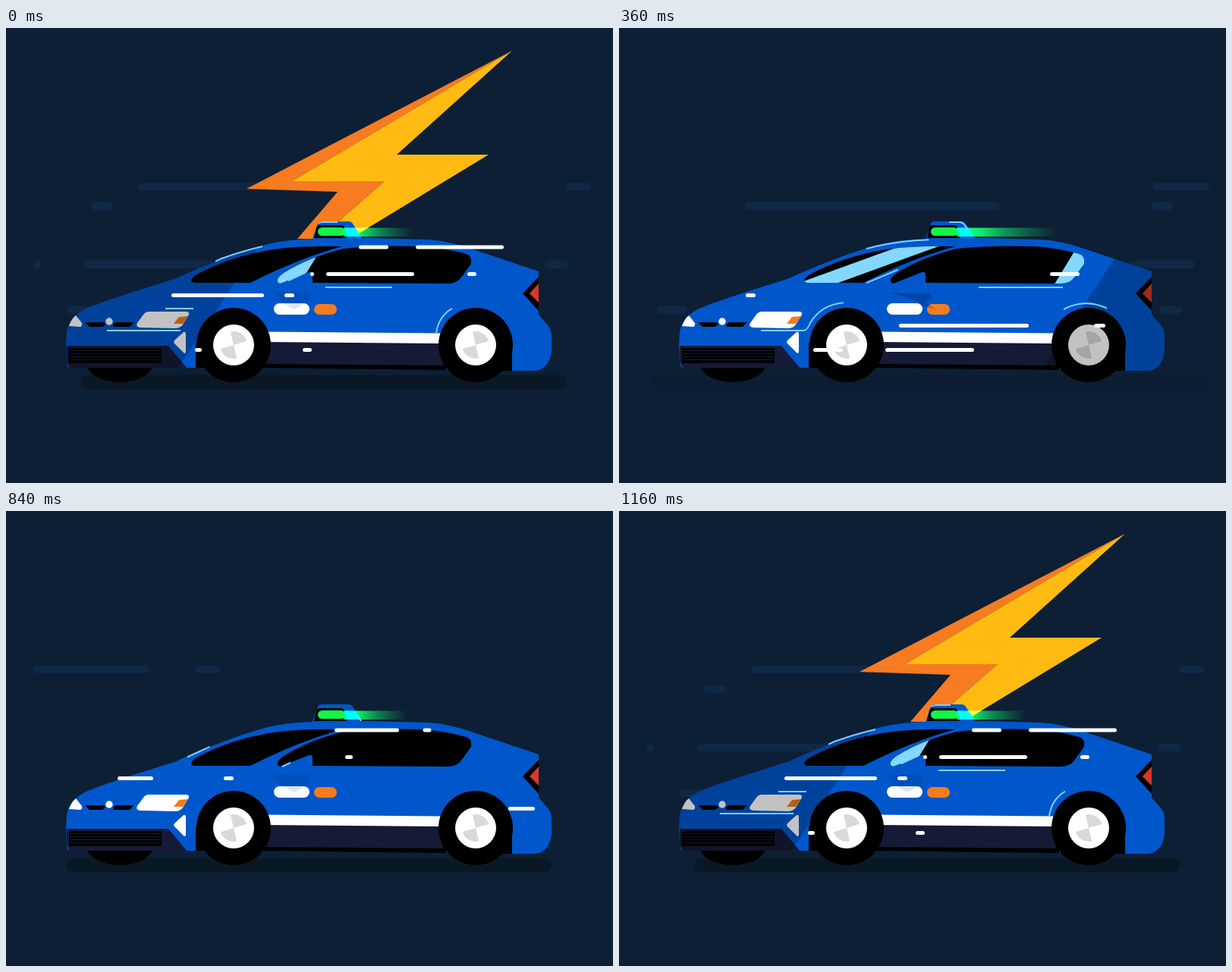
Recreate the animation shown at these times as an HTML page with a canvas. Size 800 px wide and 600 px high, loop 1200 ms.

```html
<!DOCTYPE html>
<html lang="en">
<head>
<meta charset="utf-8">
<title>Electric taxi</title>
<style>
html, body { margin: 0; width: 100%; height: 100%; overflow: hidden; background: #0d1f35; }
canvas { display: block; width: 100vw; height: 100vh; }
</style>
</head>
<body>
<canvas id="stage" width="800" height="600"></canvas>
<script>
const c = document.getElementById('stage').getContext('2d');
const LOOP = 1200, STEP = 40, CYCLE = 29;
const BLUE = '#0057cb', SKY = '#84d8ff', NAVY = '#151a36';

// Piecewise line through [step, value, step, value, ...], extended at both ends.
function along(knots, s) {
  let i = 0;
  while (i < knots.length - 4 && s > knots[i + 2]) i += 2;
  const [s0, v0, s1, v1] = knots.slice(i, i + 4);
  return v0 + (v1 - v0) * (s - s0) / (s1 - s0);
}
// Motions may run over the loop point, so each is seen in two laps.
const laps = k => [k, k + CYCLE];

function fill(path, color) { c.fillStyle = color; c.fill(path); }
function shape(d, color) { fill(new Path2D(d), color); }
function poly(pts, color) {
  c.beginPath();
  pts.forEach(p => c.lineTo(p[0], p[1]));
  c.closePath();
  c.fillStyle = color;
  c.fill();
}
function bar(x1, x2, y, h, color) {
  if (x2 - x1 < 1) return;
  c.beginPath();
  c.roundRect(x1, y - h / 2, x2 - x1, h, Math.min(h, x2 - x1) / 2);
  c.fillStyle = color;
  c.fill();
}
function disc(x, y, r, color) {
  c.beginPath();
  c.arc(x, y, r, 0, 7);
  c.fillStyle = color;
  c.fill();
}
function within(path, draw) {
  c.save();
  c.clip(path);
  draw();
  c.restore();
}
// Slanted band; its right edge is given at height y.
function band(right, width, y, slope, color) {
  const d = slope * 200, left = right - width;
  poly([[left + d, y - 200], [right + d, y - 200], [right - d, y + 200], [left - d, y + 200]], color);
}

const body = new Path2D('M79 418L80 402Q82 385 100 373Q112 365 222 331Q290 300 345 285Q375 278 410 278L480 277L555 279Q580 280 610 290L702 321V378L715 393Q719 398 719 408V426Q716 450 697 452H667L580 450L340 448H84Q80 447 80 440Z');
const shield = new Path2D('M244 333Q245 328 255 323Q300 300 352 292Q390 287 443 288Q385 304 322 336H250Q244 336 244 333Z');
const glass = new Path2D('M358 335Q356 330 366 323Q400 302 445 291Q490 286 550 288Q590 292 609 299Q614 302 613 311L600 329Q594 337 582 337L404 336V324Q403 321 399 322L364 336Q360 338 358 335Z');
const shadeArea = new Path2D(body);
for (const x of [300, 619]) {
  shadeArea.moveTo(x + 49, 418);
  shadeArea.arc(x, 418, 49, 0, Math.PI * 2);
}

// Bolt corners: tip, left, elbow, foot, foot middle, inner elbow, inner left,
// foot right, right, notch, tip right, inner tip.
function pose(tip, left, elbow, foot, mid, inElbow, inLeft, heel, right, notch, tipRight = tip, inTip = tip) {
  return [tip, left, elbow, foot, mid, inElbow, inLeft, heel, right, notch, tipRight, inTip];
}
const full = pose([667, 30], [317, 212], [437, 216], [384, 278], [412, 278], [499, 202], [377, 202], [455, 277], [636, 167], [515, 167]);
const low = [419, 172], side = [557, 137];
const enter = pose([1000, -244], [355, 197], low, low, low, [462, 163], low, [497, 154], side, side, [1000, -165], [1000, -218]);
const end = [599, 196], neck = [455, 211], inner = [487, 211];
const leave = pose(end, neck, neck, full[3], full[4], inner, inner, full[7], end, end);
const far = enter.map(([x, y]) => [x + 500, y - 342]);
const gone = full.map(() => [430, 278]);
const boltMoves = [
  [0, 5, full, leave, p => p ** 1.3],
  [5, 7, leave, gone, p => p],
  [21, 25, far, enter, p => p],
  [25, 29, enter, full, p => 1 - (1 - p) ** 3]
];

// A row is a height, its visible range, then runs of length and left-edge knots.
const row = (y, lo, hi, ...runs) => ({ y, lo, hi, runs });
const run = (len, ...knots) => ({ len, knots });

const streaks = [
  row(209, 36, 778, run(312, 17, -300, 25, 54, 29, 174, 34, 468), run(33, 17, -10, 25, 508, 29, 738)),
  row(235, 110, 765, run(29, 29, 112, 34, 328, 38, 702, 41, 754), run(336, 34, -156, 38, 166, 41, 372, 46, 746)),
  row(312, 36, 759, run(390, 25, -275, 29, 102, 34, 430), run(31, 25, 300, 29, 710), run(31, 29, 16, 34, 147, 38, 672, 41, 726)),
  row(372, 50, 742, run(60, 25, 14, 29, 80, 34, 400, 38, 712), run(30, 5, 60, 9, 250, 12, 700), run(60, 9, 30, 12, 200, 17, 760))
];
const dashes = [
  row(289, 433, 656, run(118, 25, 470, 29, 540, 34, 660), run(11, 17, 454, 25, 645), run(39, 25, 405, 29, 465, 34, 608)),
  row(324.5, 401, 625, run(116, 25, 311, 29, 422, 34, 510, 38, 626), run(39, 29, 367, 34, 435, 38, 568, 41, 612),
    run(12, 25, 477, 29, 608), run(10, 21, 447, 25, 579)),
  row(352.5, 147, 380, run(122, 25, 145, 29, 218, 34, 352), run(13, 25, 327, 29, 367)),
  row(392.5, 367, 697, run(171, 5, 197, 9, 369, 12, 419, 17, 554), run(15, 5, 393, 9, 626, 12, 677)),
  row(424.5, 249, 479, run(117, 29, 141, 34, 271, 38, 351, 41, 453), run(12, 25, 257, 29, 391, 34, 456),
    run(39, 5, 217, 9, 256, 12, 371, 17, 462))
];

// Glints: a path and the x of both ends at the shared steps (short lists skip the first).
const GLINT_STEPS = [17, 25, 29, 34, 38, 41, 46];
function glint(d, from, to) {
  const knots = xs => xs.flatMap((x, i) => [GLINT_STEPS[i + 7 - xs.length], x]);
  return { path: new Path2D(d), from: knots(from), to: knots(to) };
}
const glints = [
  glint('M222 332L253 318L284 304Q312 294 338 288Q380 279 424 279', [224, 254, 276, 304, 326, 343, 414], [253, 284, 338, 384, 408, 423, 424]),
  glint('M110 399H243Q248 399 252 389Q268 362 303 362Q325 363 339 378', [110, 133, 163, 187, 205, 284], [158, 230, 274, 296, 314, 340]),
  glint('M163 385H172L180 378L210 370H247L275 357L317 340L405 303L440 291L469 286', [163, 210, 275, 326, 362, 448], [180, 247, 317, 368, 405, 469]),
  glint('M364 337L400 320', [364, 372, 400, 410, 420, 430], [385, 395, 400, 400, 400, 400]),
  glint('M404 342H578Q590 343 598 335L619 312', [404, 421, 450, 474, 491, 576], [442, 509, 561, 585, 600, 620]),
  glint('M567 402Q573 365 616 363Q643 364 660 383', [566, 566, 570, 586, 603, 635], [571, 588, 618, 643, 659, 661]),
  glint('M412 258Q413 256 418 256H448Q453 256 455 259L468 277', [411, 411, 414, 435, 444, 455], [424, 437, 452, 460, 469, 469])
];

const groundLeft = [0, 99, 5, 45, 9, 42, 12, 61, 17, 69, 29, 99];
const groundWidth = [0, 640, 5, 733, 9, 737, 12, 640, 29, 640];
const trail = [0, 537, 5, 566, 9, 578, 12, 552, 17, 530, 25, 527, 29, 537];
const spin = [0, 0, 5, 90, 9, 180, 12, 360, 17, 450, 29, 720];
const shieldShine = [0, 180, 5, 238, 9, 289, 12, 338];
const glassShine = [25, 275, 29, 388, 34, 540, 38, 635];
const shade = [21, 20, 25, 122, 29, 272, 34, 737, 38, 968, 41, 1062];

function drawGround(k) {
  const x = along(groundLeft, k), w = along(groundWidth, k);
  c.globalAlpha = 1 - (w - 640) * .0084;
  bar(x, x + w, 467, 19, '#0a1825');
  c.globalAlpha = 1;
}

function drawBolt(k) {
  const move = boltMoves.find(m => k >= m[0] && k < m[1]);
  if (!move) return;
  const [a, b, from, to, ease] = move;
  const p = ease((k - a) / (b - a));
  const pts = from.map(([x, y], i) => [x + (to[i][0] - x) * p, y + (to[i][1] - y) * p]);
  const pick = list => list.map(i => pts[i]);
  poly(pick([0, 1, 2, 3, 4, 5, 6, 11]), '#f77b20');
  poly(pick([11, 6, 5, 4, 7, 8, 9, 10]), '#ffbb12');
}

function drawWheel(x, turn) {
  disc(x, 418, 49, '#000');
  disc(x, 418, 27, '#fff');
  c.fillStyle = '#d9d9d9';
  for (const half of [0, Math.PI]) {
    const a = turn * Math.PI / 180 + half - 1.8;
    c.beginPath();
    c.moveTo(x, 418);
    c.arc(x, 418, 18, a, a + 1.5);
    c.fill();
  }
}

function drawFront() {
  shape('M80 419H214L238 448H84L80 440Z', NAVY);
  c.fillStyle = '#000';
  c.fillRect(83, 422, 122, 20);
  c.fillStyle = NAVY;
  for (let y = 425; y < 441; y += 4) c.fillRect(84, y, 120, 1);
  shape('M92 379L100 389Q101 394 97 394L83 393Q86 384 92 379Z', '#fff');
  shape('M104 388H129L131 391L127 394H110ZM145 388H169L163 394H142L141 391Z', '#000');
  disc(136, 387, 4.7, '#fff');
  shape('M188 374H237Q242 374 241 378L233 391Q230 396 222 396L177 395Q170 394 173 389L181 378Q184 374 188 374Z', '#fff');
  shape('M228 381L240 380L233 390H221Z', '#f57c1c');
  shape('M234 401Q237 400 237 404V427Q236 431 233 427L222 416Q220 414 223 411Z', '#fff');
}

function drawGlass(path, k, knots, width, slope) {
  fill(path, '#000');
  within(path, () => laps(k).forEach(s => band(along(knots, s), width, 336, slope, SKY)));
}

function drawCar(k) {
  c.beginPath();
  c.ellipse(150, 442, 44, 25, 0, 0, 7);
  c.fillStyle = '#000';
  c.fill();
  fill(body, BLUE);
  drawGlass(shield, k, shieldShine, 51, 2.75);
  drawGlass(glass, k, glassShine, 60, .61);

  shape('M702 328L681 350L702 373Z', '#000');
  shape('M702 337L690 350L702 362Z', '#d3392c');

  shape('M330 413L580 414V451L330 448Z', '#000');
  shape('M340 412L576 414V445L340 443Z', NAVY);
  shape('M340 400.5L573 402.5L571 416L340 414Z', '#fff');

  shape('M250 415H300V448H250ZM619 415H667V452H619Z', '#000');
  const turn = along(spin, k);
  drawWheel(300, turn);
  drawWheel(619, turn);
  drawFront();

  bar(353, 400, 370.5, 15, '#fff');
  bar(406, 436, 371, 14, '#f57c1c');
  if (k > 3 && k < 21) shape('M357 349L410 350L413 358L402 361L418 371L403 367L385 357Z', 'rgba(14,30,80,.3)');
  else shape('M352 348H402L397 361L380 371L362 361Z', 'rgba(14,30,80,.12)');

  within(shadeArea, () => laps(k).forEach(s => band(along(shade, s), 365, 380, .66, 'rgba(0,0,0,.24)')));
}

function drawSign(k) {
  shape('M404 278L411 258Q412 255 416 255H451Q455 255 457 258L470 278Z', BLUE);
  shape('M406 277L409 263Q410 260 413 260H441Q445 260 446 263L449 277Z', '#000');
  bar(411, 447, 268.5, 11, '#14f548');
  const tail = along(trail, k);
  const g = c.createLinearGradient(443, 0, tail, 0);
  [1, .8, .45, .2, 0].forEach((a, i) => g.addColorStop(i / 4, `rgba(0,255,70,${a})`));
  c.save();
  c.globalCompositeOperation = 'lighter';
  c.fillStyle = g;
  c.fillRect(445, 263.5, tail - 445, 11.5);
  c.restore();
}

function drawGlints(k) {
  c.strokeStyle = '#7fd0ff';
  c.lineWidth = 2;
  for (const { path, from, to } of glints) {
    for (const s of laps(k)) {
      const a = along(from, s), b = along(to, s);
      if (b <= a) continue;
      const gap = new Path2D();
      gap.rect(a, 0, b - a, 600);
      within(gap, () => c.stroke(path));
    }
  }
}

function drawRows(rows, k, h, color) {
  for (const { y, lo, hi, runs } of rows) {
    for (const { len, knots } of runs) {
      for (const s of laps(k)) {
        const x = along(knots, s);
        bar(Math.max(lo, x), Math.min(hi, x + len), y, h, color);
      }
    }
  }
}

function draw(time) {
  const k = Math.floor(time % LOOP / STEP) % CYCLE;
  c.fillStyle = '#0d1f35';
  c.fillRect(0, 0, 800, 600);
  drawRows(streaks, k, 10, '#0f2846');
  drawGround(k);
  drawBolt(k);
  drawCar(k);
  drawSign(k);
  drawGlints(k);
  drawRows(dashes, k, 5, '#fff');
}

const start = performance.now();
function tick() {
  draw(performance.now() - start);
  requestAnimationFrame(tick);
}
tick();
</script>
</body>
</html>
```
